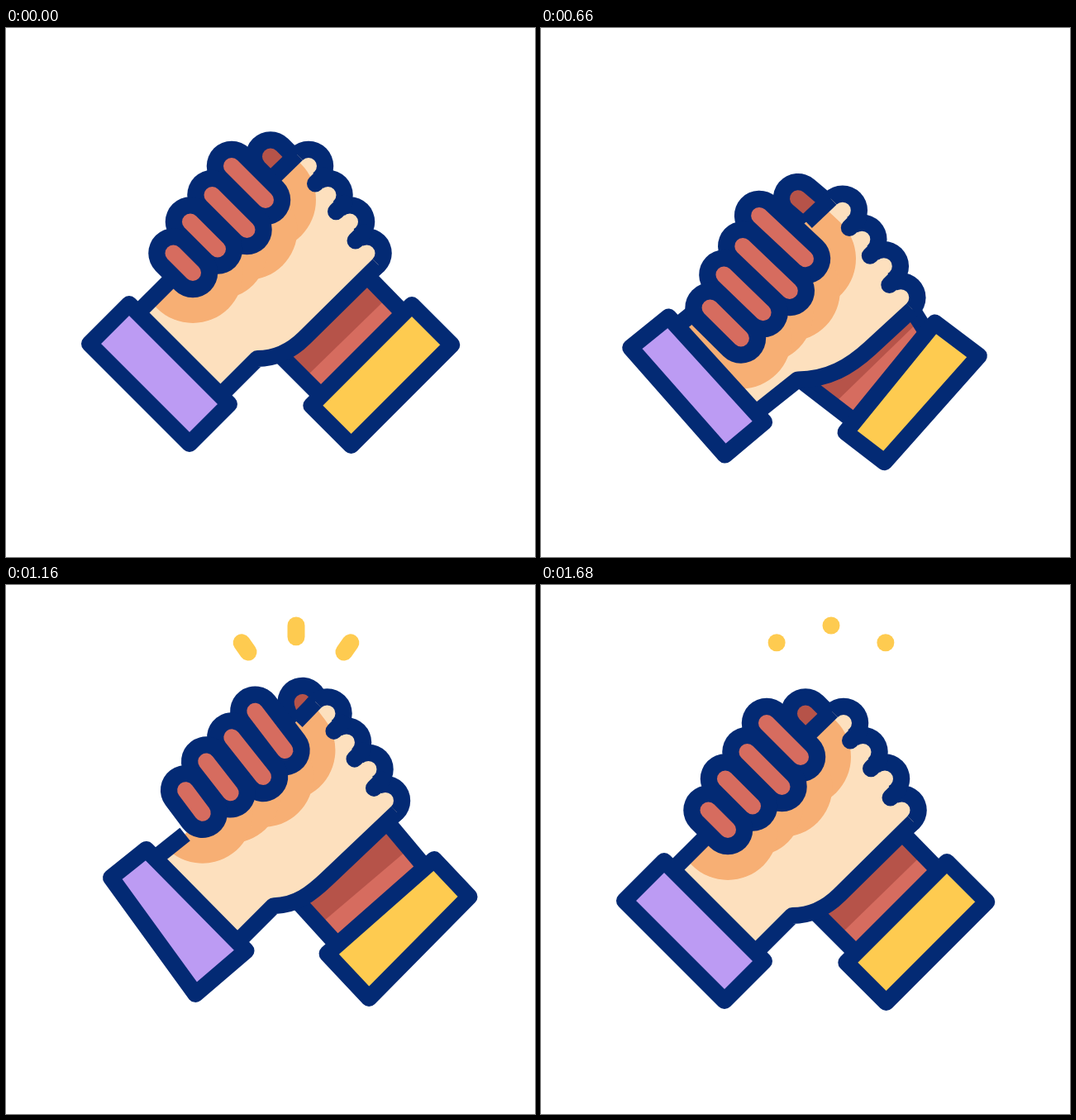
Write an HTML page with a canvas that moves like this. It is 640 px wide and 640 px high and loops after 2.4 s.

```html
<!DOCTYPE html>
<html lang="en">
<head>
<meta charset="utf-8">
<title>Hand clasp</title>
<style>
  html, body { margin: 0; width: 100%; height: 100%; overflow: hidden; background: #fff; }
  canvas { display: block; width: 100vmin; height: 100vmin; margin: auto; }
</style>
</head>
<body>
<canvas id="stage" width="640" height="640"></canvas>
<script>
const ctx = document.getElementById('stage').getContext('2d');
const NAVY = '#032a74', SKIN = '#fde0be', SHADE = '#f7af74', BROWN = '#d66c5f',
      DARK = '#b65349', PURPLE = '#bc9bf3', YELLOW = '#fecb50';
const LOOP = 2400, STEP = 20, LOW = 560, HIGH = 1080, REST = 1680;

// Knuckle row of the front hand; the back hand's fingers use its mirror image.
const row = [[0, 0], [23.5, 35], [50, 67.5], [70.5, 105.5]];
const fingerSpan = [41, 42, 33, 23.5];

// How far each handle travels: x, y to the low pose, then x, y to the high pose.
const move = {
  leftCuff: [[4, 18, 21.5, -14.6], [-1.6, 24.5, 21.3, -13], [0, 15.3, 7.5, -8.4], [5.6, 7.6, 27, -29]],
  rightCuff: [[-18, 23.5, 28, -3], [-12, 15, 22, -6.5], [-4, 22.3, 22.3, -5.3], [-2.5, 36, 20, -11]],
  // First and last finger; the ones between are blended.
  fingerBase: [[-12, 66, 29.4, -14.8], [1, 73.4, 15.2, -25.2]],
  fingerTip: [[4.5, 77.7, 24.3, -8.3], [16.2, 87.6, 12.2, -21]],
  knuckle: [-3.2, 59, 23.3, -12],
  thumb: [-13, 56, 40, -14],
  heel: [5.5, 28.5, 20.5, -12.3],
  bend: [38, 15, 28, -20],
  armTop: [10, 44, 25, -13.5],
  armLow: [-20, 34, 18, -17.5]
};

const mix = (a, b, k) => a.map((v, i) => v + (b[i] - v) * k);
const shift = ([x, y], dx, dy) => [x + dx, y + dy];

// A rectangle turned by 45 degrees, from its top corner.
const tilted = (x, y, right, left) =>
  [[x, y], [x + right, y + right], [x + right - left, y + right + left], [x - left, y + left]];

// Same curve as the CSS ease-in-out keyword.
function ease(t, from, to) {
  const x = Math.min(1, Math.max(0, (t - from) / (to - from)));
  let lo = 0, hi = 1;
  for (let i = 0; i < 24; i++) {
    const s = (lo + hi) / 2, r = 1 - s;
    if (1.26 * s * r * r + 1.74 * s * s * r + s ** 3 < x) lo = s; else hi = s;
  }
  return lo * lo * (3 - 2 * lo);
}

function pose(t) {
  const up = ease(t, LOW, HIGH);
  const low = ease(t, 0, LOW) - up, high = up - ease(t, HIGH, REST);
  const put = ([x, y], [lx, ly, hx, hy]) => [x + lx * low + hx * high, y + ly * low + hy * high];

  const leftCuff = tilted(149, 334, 121, 48).map((p, i) => put(p, move.leftCuff[i]));
  const rightCuff = tilted(491, 335, 48.3, 121.7).map((p, i) => put(p, move.rightCuff[i]));
  const fingers = row.map(([dx, dy], i) => {
    const base = [273 - dx, 167 + dy], tip = shift(base, fingerSpan[i], fingerSpan[i]);
    return [put(base, mix(...move.fingerBase, i / 3)), put(tip, mix(...move.fingerTip, i / 3))];
  });
  const thumb = [put([320, 155.5], move.thumb), put([345, 180.5], move.knuckle)];

  const [top, right, , left] = leftCuff;
  const wristTop = mix(top, right, 0.087);
  const knuckle = put([366, 167], move.knuckle);
  const palm = {
    tips: row.map(o => shift(knuckle, ...o)),
    thumbEnd: put([326, 178], mix(move.knuckle, move.fingerBase[0], 0.5)),
    bend: put([361, 375], move.bend),
    heel: put([304, 400], move.heel),
    wristLow: mix(top, right, 0.913),
    wristTop,
    wristIn: shift(wristTop, 0.85 * (top[0] - left[0]), 0.85 * (top[1] - left[1]))
  };
  const arm = {
    topIn: put([438, 301], move.armTop), topOut: put([478, 342], move.rightCuff[0]),
    lowIn: put([334, 398], move.armLow), lowOut: put([378, 442], move.rightCuff[3])
  };
  return { leftCuff, rightCuff, fingers, thumb, palm, arm };
}

function poly(points, close) {
  const path = new Path2D();
  points.forEach(p => path.lineTo(...p));
  if (close) path.closePath();
  return path;
}

function fill(path, color) {
  ctx.fillStyle = color;
  ctx.fill(path);
}

function stroke(path, color = NAVY, width = 20, cap = 'butt') {
  ctx.strokeStyle = color;
  ctx.lineWidth = width;
  ctx.lineCap = cap;
  ctx.stroke(path);
}

function capsules(list, color, width) {
  list.forEach(ends => stroke(poly(ends), color, width, 'round'));
}

function drawFingers(list, color) {
  capsules(list, NAVY, 60.5);
  capsules(list, color, 20);
}

function drawCuff(points, color) {
  const path = poly(points, true);
  fill(path, color);
  stroke(path);
}

function drawArm({ topIn, topOut, lowIn, lowOut }) {
  const lit = [mix(topIn, topOut, 0.6), topOut, lowOut, mix(lowIn, lowOut, 0.6)];
  fill(poly([topIn, topOut, lowOut, lowIn], true), DARK);
  fill(poly(lit, true), BROWN);
  stroke(poly([topIn, topOut]));
  stroke(poly([lowIn, lowOut]));
}

// Straight side of the hand, then the curve into the heel.
function addHeel(path, from, { bend, heel }) {
  const dx = bend[0] - from[0], dy = bend[1] - from[1];
  const reach = 0.35 * Math.hypot(bend[0] - heel[0], bend[1] - heel[1]) / Math.hypot(dx, dy);
  path.lineTo(...bend);
  path.bezierCurveTo(bend[0] + dx * reach, bend[1] + dy * reach,
    heel[0] + 0.42 * (bend[0] - heel[0]), heel[1], ...heel);
}

function drawPalm(p, fingers) {
  const { tips } = p;
  const thumbTop = shift(tips[0], -14.1, -14.1);
  const edge = shift(tips[3], 14.1, 14.1);

  const body = poly([p.thumbEnd, thumbTop, ...tips, edge]);
  addHeel(body, edge, p);
  [p.wristLow, p.wristTop, p.wristIn].forEach(q => body.lineTo(...q));
  body.closePath();
  tips.forEach(([x, y]) => {
    body.moveTo(x + 10, y);
    body.arc(x, y, 10, 0, 2 * Math.PI);
  });

  capsules(tips.map(q => [q, q]), NAVY, 60.5);
  fill(body, SKIN);
  ctx.save();
  ctx.clip(body);
  capsules(fingers, SHADE, 122);
  ctx.restore();

  const notches = tips.slice(1).map((q, i) => {
    const n = shift(mix(tips[i], q, 0.5), -3.5, 3.7);
    return [n, shift(n, 10, -10)];
  });
  capsules(notches, NAVY, 20.5);
  stroke(poly([p.thumbEnd, thumbTop]));
  stroke(poly([p.wristTop, p.wristIn]));
  const lower = poly([edge]);
  addHeel(lower, edge, p);
  lower.lineTo(...p.wristLow);
  stroke(lower);
}

function drawSparks(t) {
  const head = ease(t, 940, 1150), tail = ease(t, 1050, 1260);
  if (head <= 0 || tail >= 1) return;
  for (const side of [-1, 0, 1]) {
    const at = k => [351 + (85 + 30 * k) * Math.sin(0.61 * side), 164 - (85 + 30 * k) * Math.cos(0.61 * side)];
    stroke(poly([at(tail), at(head)]), YELLOW, 21, 'round');
  }
}

function draw(t) {
  const p = pose(t);
  ctx.fillStyle = '#fff';
  ctx.fillRect(0, 0, 640, 640);
  ctx.lineJoin = 'round';

  drawSparks(t);
  drawArm(p.arm);
  drawCuff(p.rightCuff, YELLOW);
  drawFingers([p.thumb], DARK);
  drawPalm(p.palm, p.fingers);
  drawFingers(p.fingers, BROWN);
  drawCuff(p.leftCuff, PURPLE);
}

const start = performance.now();
function tick() {
  const t = (performance.now() - start) % LOOP;
  draw(Math.floor(t / STEP) * STEP);
  requestAnimationFrame(tick);
}
tick();
</script>
</body>
</html>
```
